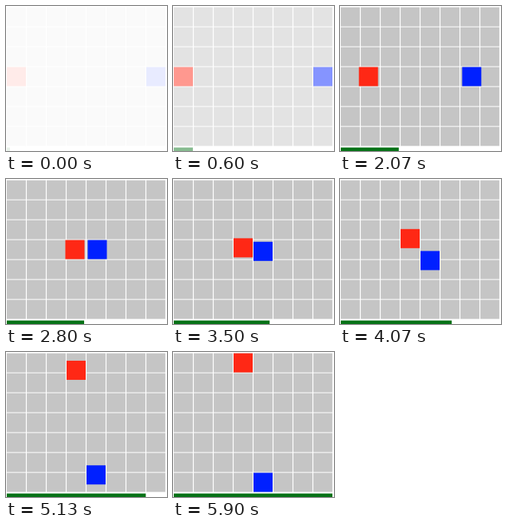
Animation, 202 px wide and 182 px high, one loop 8830 ms. Source, as an HTML page:

```html
<!DOCTYPE html>
<html lang="en">
<head>
<meta charset="utf-8">
<title>Two squares on a grid</title>
<style>
  html, body {
    margin: 0;
    width: 100%;
    height: 100%;
    overflow: hidden;
    background: #fff;
  }
  svg { display: block; }
  .scene, .square, .bar {
    animation-duration: 8830ms;
    animation-iteration-count: infinite;
    animation-timing-function: linear;
  }
  .scene { animation-name: fade; }
  .cells { fill: #c5c5c5; }
  .lines {
    stroke: #fff;
    stroke-dasharray: 1.2 23.8;
  }
  .square {
    animation-name: across, along;
    animation-timing-function: cubic-bezier(.7, 0, .27, .8);
  }
  .red { fill: #ff2815; --x: 75px; --y: -75px; }
  .blue { fill: #0020ff; --x: -75px; --y: 75px; }
  .bar {
    fill: #067217;
    transform-origin: 1px 0;
    animation-name: grow;
  }

  /* fade in, meet in the middle, then part vertically */
  @keyframes fade {
    0% { opacity: .09; }
    15.855%, 100% { opacity: 1; }
  }
  @keyframes across {
    0%, 15.855% { translate: 0 0; }
    32.843%, 100% { translate: var(--x) 0; }
  }
  @keyframes along {
    0%, 32.843% { transform: translateY(0); }
    66.818%, 100% { transform: translateY(var(--y)); }
  }
  @keyframes grow {
    0% { transform: scaleX(.02); }
    66.5%, 100% { transform: scaleX(1); }
  }
</style>
</head>
<body>
<svg width="202" height="182" viewBox="0 0 202 182">
  <g class="scene">
    <g transform="translate(0 .6)">
      <rect class="cells" x="1" y="1" width="199" height="174"/>
      <!-- wide dashed strokes: each dash is one grid line -->
      <path class="lines" d="M24.9 88H200" stroke-width="174"/>
      <path class="lines" d="M100.5 24.9V175" stroke-width="199"/>
      <rect class="square red" x="1" y="76" width="24" height="24"/>
      <rect class="square blue" x="176" y="76" width="24" height="24"/>
      <rect class="bar" x="1" y="177" width="199" height="5"/>
    </g>
  </g>
</svg>
</body>
</html>
```
